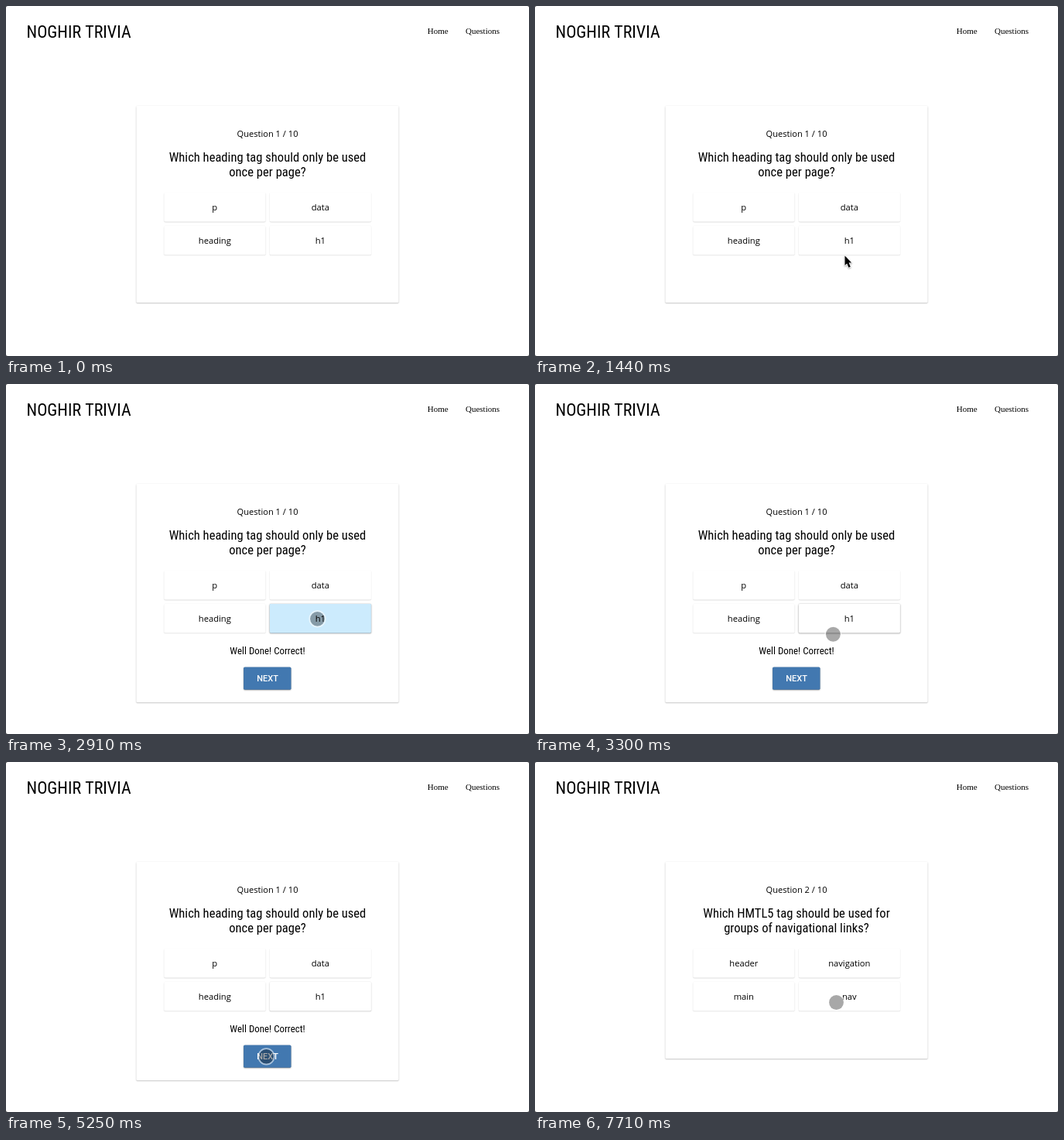
Write an HTML page with a canvas that moves like this. It is 676x452 px and loops after 8000 ms.

```html
<!DOCTYPE html>
<html lang="en">
<head>
<meta charset="utf-8">
<title>Trivia quiz</title>
<style>
html, body { margin: 0; width: 100%; height: 100%; overflow: hidden; background: #fff; }
canvas { display: block; width: 676px; height: 452px; }
</style>
</head>
<body>
<canvas id="stage"></canvas>
<script>
const W = 676, H = 452, LOOP = 8000, TICK = 30;
const canvas = document.getElementById('stage');
const ctx = canvas.getContext('2d');
const dpr = window.devicePixelRatio || 1;
canvas.width = W * dpr;
canvas.height = H * dpr;

const OPEN = '"Open Sans", sans-serif';
const SERIF = '"Liberation Serif", serif';
const ROBOTO = 'Roboto, sans-serif';
const NARROW = '"Roboto Condensed", Roboto, sans-serif';

const QUESTIONS = [
  { lines: ['Which heading tag should only be used', 'once per page?'],
    answers: ['p', 'data', 'heading', 'h1'] },
  { lines: ['Which HMTL5 tag should be used for', 'groups of navigational links?'],
    answers: ['header', 'navigation', 'main', 'nav'] }
];

const clamp = v => Math.max(0, Math.min(1, v));
const part = (t, a, b) => clamp((t - a) / (b - a));
const mix = (a, b, k) => a + (b - a) * k;
const smooth = k => k * k * (3 - 2 * k);
const easeOut = k => 1 - (1 - k) * (1 - k);

function text(str, x, y, size, family, { align = 'center', color = '#000', weight = 400 } = {}) {
  const stretch = family === NARROW ? 'condensed' : 'normal';
  ctx.font = `${weight} ${stretch} ${size}px ${family}`;
  ctx.textAlign = align;
  ctx.fillStyle = color;
  ctx.fillText(str, x, y);
}

// Raised panel; depth scales the shadow from flat (0) to focused (2).
function panel(x, y, w, h, fill, depth = 1) {
  const layers = [
    [mix(1.5, 2.2, depth / 2), 0.12 * depth],
    [mix(1, 1.8, depth / 2), 0.2 * depth]
  ];
  ctx.save();
  ctx.fillStyle = fill;
  ctx.beginPath();
  ctx.roundRect(x, y, w, h, 1.4);
  for (const [blur, alpha] of layers) {
    ctx.shadowColor = `rgba(0,0,0,${alpha})`;
    ctx.shadowOffsetY = 0.7 * dpr;
    ctx.shadowBlur = blur * dpr;
    ctx.fill();
  }
  ctx.restore();
}

function disc(x, y) {
  ctx.beginPath();
  ctx.arc(x, y, 10.2, 0, 7);
  ctx.strokeStyle = 'rgba(255,255,255,.55)';
  ctx.lineWidth = 1.8;
  ctx.stroke();
  ctx.beginPath();
  ctx.arc(x, y, 9.4, 0, 7);
  ctx.fillStyle = 'rgba(0,0,0,.34)';
  ctx.fill();
}

function arrow(x, y) {
  ctx.save();
  ctx.translate(x, y);
  ctx.beginPath();
  [[0.5, 0.5], [0.5, 13], [3.2, 10.5], [5.4, 15.8], [7.8, 14.8], [5.6, 9.6], [9.2, 9.4]]
    .forEach(([px, py]) => ctx.lineTo(px, py));
  ctx.closePath();
  ctx.lineJoin = 'round';
  ctx.strokeStyle = '#fff';
  ctx.lineWidth = 1.6;
  ctx.shadowColor = 'rgba(0,0,0,.35)';
  ctx.shadowBlur = 2 * dpr;
  ctx.shadowOffsetY = dpr;
  ctx.stroke();
  ctx.shadowColor = 'transparent';
  ctx.fillStyle = '#000';
  ctx.fill();
  ctx.restore();
}

function pointer(t) {
  if (t < 420) return;
  if (t < 1290) {
    const k = easeOut(part(t, 390, 1200));
    return arrow(mix(392, 400, k), mix(452, 322, k));
  }
  if (t < 1440) return disc(411, 333.5);
  if (t < 1620) return arrow(400, 322);
  if (t < 3150) {
    const k = smooth(part(t, 1590, 1890));
    return disc(mix(400, 402.5, k), mix(322, 303.3, k));
  }
  if (t < 7200) {
    const k = smooth(part(t, 3120, 3660));
    return disc(mix(402.5, 336.5, k), mix(303.3, 380.3, k));
  }
  const go = smooth(part(t, 7170, 7560)), back = smooth(part(t, 7560, 7710));
  disc(mix(336.5, 397.5, go) - 8 * back, mix(380.3, 306, go) + 4.5 * back);
}

function header() {
  text('NOGHIR TRIVIA', 26.5, 40.5, 22, NARROW, { align: 'left' });
  text('Home', 544.8, 36, 11, SERIF, { align: 'left' });
  text('Questions', 594, 36, 11, SERIF, { align: 'left' });
}

function quiz(t) {
  const index = t < 5310 ? 0 : 1;
  const solved = t >= 2880 && t < 5310;
  const tapped = t >= 2880 && t < 2970;
  const lift = easeOut(part(t, 2490, 2820)) * (1 - part(t, 4920, 5460));
  const { lines, answers } = QUESTIONS[index];

  panel(168.5, 128.8, 339, solved ? 282.4 : 254.4, '#fff');
  text(`Question ${index + 1} / 10`, 338, 169, 11.1, OPEN);
  lines.forEach((line, i) => text(line, 338, 201 + 19.2 * i, 16.6, NARROW));

  answers.forEach((answer, i) => {
    const x = 204.4 + 136.5 * (i % 2), y = 241 + 42.9 * (i >> 1);
    const last = i === 3;
    panel(x, y, 131, 37.5, last && tapped ? '#ccebfd' : '#fff', last ? mix(0.6, 1.8, lift) : 0.6);
    text(answer, x + 65.4, y + 23, 11.2, OPEN);
  });

  if (solved) {
    text('Well Done! Correct!', 338, 349, 12.9, NARROW);
    panel(307.3, 365.8, 61, 28.8, '#4278b0', 1.6);
    text('NEXT', 338, 384.2, 11, ROBOTO, { color: '#fff', weight: 500 });
  }
}

function corners() {
  ctx.beginPath();
  ctx.rect(0, 0, W, H);
  ctx.roundRect(0, 0, W, H, 2.5);
  ctx.fillStyle = '#555';
  ctx.fill('evenodd');
}

function draw(now) {
  const t = Math.floor((now % LOOP) / TICK) * TICK;
  ctx.setTransform(dpr, 0, 0, dpr, 0, 0);
  ctx.fillStyle = '#fff';
  ctx.fillRect(0, 0, W, H);
  header();
  quiz(t);
  pointer(t);
  corners();
}

const start = performance.now();
function loop() {
  draw(performance.now() - start);
  requestAnimationFrame(loop);
}
loop();
</script>
</body>
</html>
```
